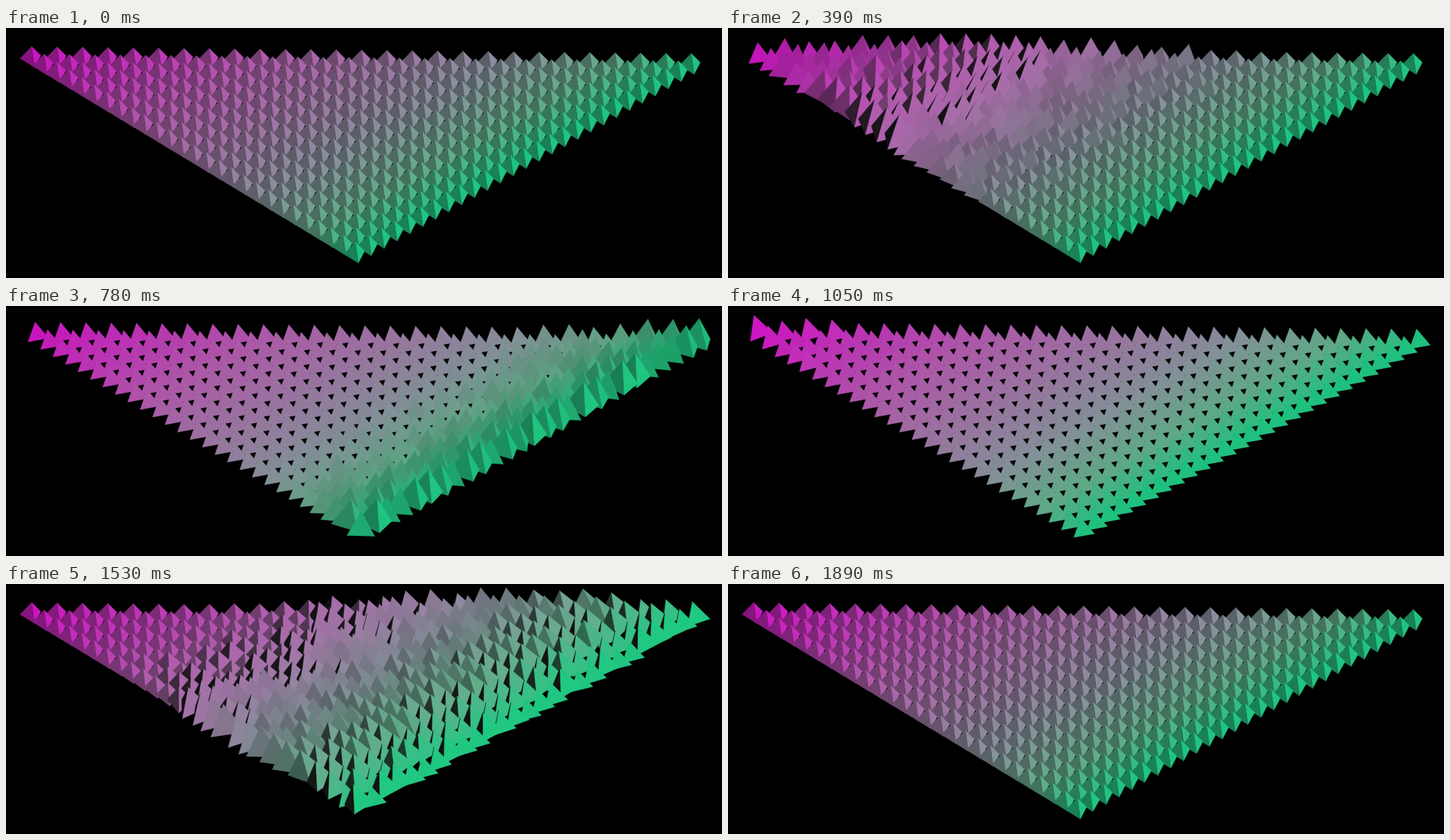
Recreate the animation shown at these times as an HTML page with a canvas. Size 1028 px wide and 360 px high, loop 1920 ms.

```html
<!DOCTYPE html>
<html>
<head>
<meta charset="utf-8">
<style>
  html, body { margin: 0; width: 100%; height: 100%; overflow: hidden; background: #000; }
  canvas { display: block; }
</style>
</head>
<body>
<canvas id="stage" width="1028" height="360"></canvas>
<script>
const ctx = document.getElementById('stage').getContext('2d');

const LOOP = 1920, PASS = LOOP / 2, SPREAD = 480, TURN = 440, JITTER = 80;
const SIDE = 26;
const ORIGIN = [40.45, 41.1], STEP_A = [36.42, 0.385], STEP_B = [17.88, 10.83];

// View space: x right, y down, z towards the viewer.
const AXIS = [-0.061, -0.882, 0.467];
const LIGHT = [0.64, -0.1, 0.76];
const OFFSET = [-3.45, 0.6, 0.65];
const RADIUS = 18.7;
const CORNERS = [
  [-0.07, -15.1, 11], [4.05, 15.1, 10.25],
  [-16.9, 2.1, -7.85], [12.9, -2.1, -13.4]
];
const FACES = [[1, 2, 3], [0, 2, 3], [0, 1, 3], [0, 1, 2]];

const STOPS = [
  [0, 207, 22, 196], [9, 178, 92, 174], [14, 160, 120, 166],
  [19, 135, 150, 157], [23, 98, 175, 140], [26, 32, 200, 130]
];
const SHADOW = 17;

const dot = (a, b) => a[0] * b[0] + a[1] * b[1] + a[2] * b[2];
const clamp = x => Math.min(1, Math.max(0, x));
const smooth = p => p * p * (3 - 2 * p);

let seed = 7;
function random() {
  seed = seed * 16807 % 2147483647;
  return seed / 2147483647;
}

function rotate(v, angle) {
  const c = Math.cos(angle), s = Math.sin(angle), along = dot(AXIS, v) * (1 - c);
  const cross = [
    AXIS[1] * v[2] - AXIS[2] * v[1],
    AXIS[2] * v[0] - AXIS[0] * v[2],
    AXIS[0] * v[1] - AXIS[1] * v[0]
  ];
  return v.map((x, k) => x * c + cross[k] * s + AXIS[k] * along);
}

function gradient(u) {
  const n = Math.max(1, STOPS.findIndex(stop => stop[0] >= u));
  const from = STOPS[n - 1], to = STOPS[n];
  const f = (u - from[0]) / (to[0] - from[0]);
  return [1, 2, 3].map(k => from[k] + (to[k] - from[k]) * f);
}

function shade(color, normal) {
  const d = dot(normal, LIGHT);
  const level = clamp(0.57 + (d > 0 ? 0.45 : 1.6) * d);
  return `rgb(${color.map(c => Math.round(SHADOW + (c - SHADOW) * level))})`;
}

const solids = [];
for (let j = 0; j <= SIDE; j++) {
  for (let i = 0; i + j <= SIDE; i++) {
    const u = i + j;
    solids.push({
      x: ORIGIN[0] + i * STEP_A[0] + j * STEP_B[0],
      y: ORIGIN[1] + i * STEP_A[1] + j * STEP_B[1],
      color: gradient(u),
      delay: Math.max(0, SPREAD * u / SIDE + JITTER * (random() - 0.5))
    });
  }
}

function drawSolid(solid, time, second) {
  const p = clamp((time - solid.delay) / TURN);
  const angle = -Math.PI * (smooth(p) + second);
  const bump = Math.sin(Math.PI * p) ** 2, scale = 1 + 0.75 * bump;
  const center = rotate(OFFSET, angle);
  const x = solid.x + center[0] + (second ? -7 : 6) * bump;
  const y = solid.y + center[1] - (second ? 14 : 8) * bump;
  const points = CORNERS.map(v => rotate(v, angle));

  FACES.forEach((face, opposite) => {
    const normal = points[opposite].map(c => -c / RADIUS);
    if (normal[2] <= 0) return;
    ctx.beginPath();
    for (const k of face) ctx.lineTo(x + points[k][0] * scale, y + points[k][1] * scale);
    ctx.closePath();
    ctx.fillStyle = ctx.strokeStyle = shade(solid.color, normal);
    ctx.fill();
    ctx.stroke();
  });
}

function frame() {
  const t = performance.now() % LOOP;
  const second = t >= PASS ? 1 : 0;
  ctx.fillStyle = '#000';
  ctx.fillRect(0, 0, 1028, 360);
  ctx.lineWidth = 0.4;
  ctx.lineJoin = 'round';
  for (const solid of solids) drawSolid(solid, t % PASS, second);
  requestAnimationFrame(frame);
}
frame();
</script>
</body>
</html>
```
